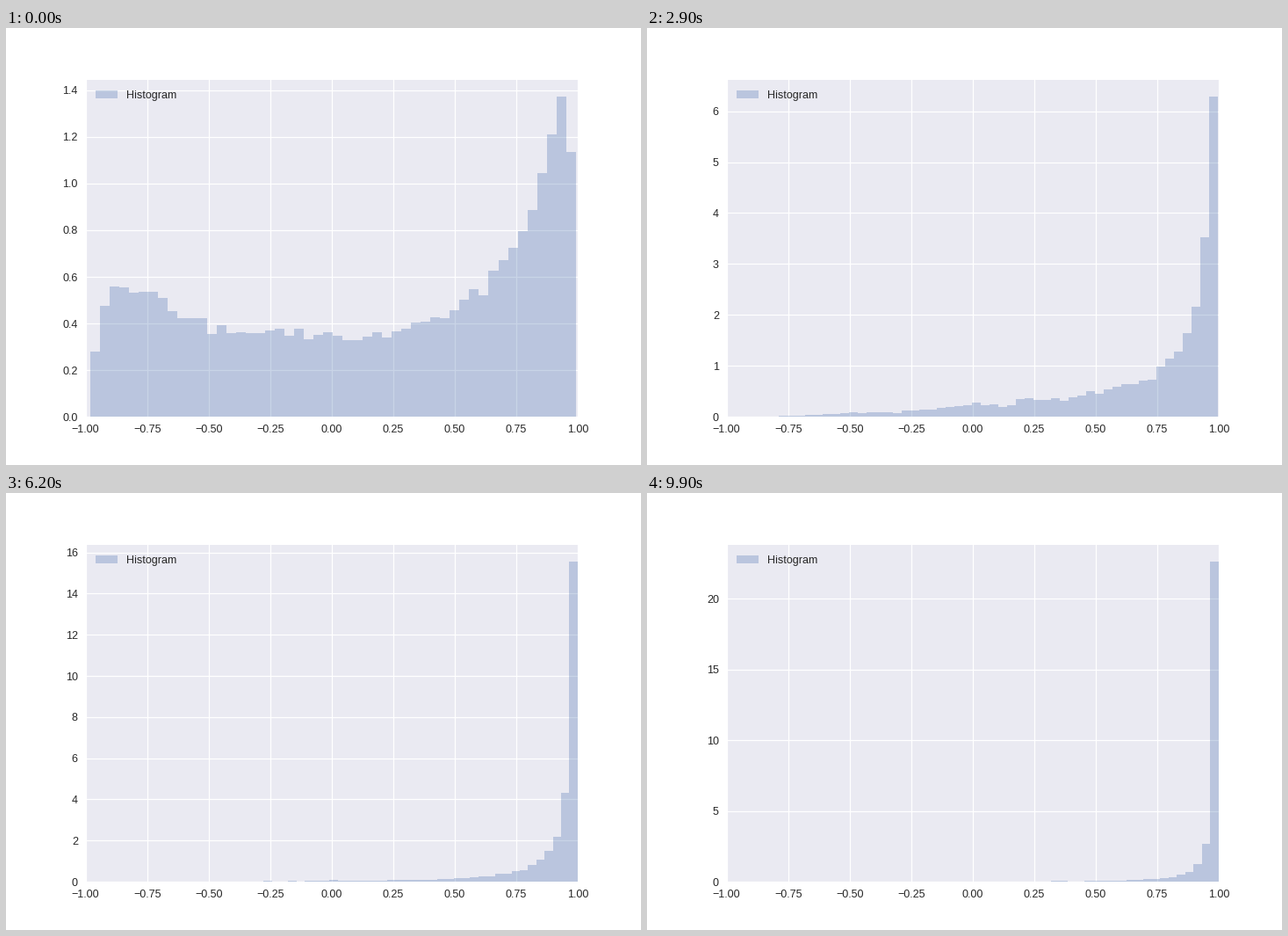
A matplotlib script that plays this animation: 723x497 px, repeating every 10000 ms.

```python
import numpy as np
import matplotlib.pyplot as plt
from matplotlib.animation import FuncAnimation

W, H, DPI = 723, 497, 64
FRAMES, INTERVAL = 100, 100
BINS, SAMPLES = 50, 10000
PX = 72 / DPI  # points per pixel

plt.rcParams.update({
    "font.family": "Liberation Sans",
    "font.size": 12.5 * PX,
    "text.color": "0.15",
    "xtick.color": "0.15",
    "ytick.color": "0.15",
    "axes.facecolor": "#EAEAF2",
    "axes.axisbelow": True,
    "grid.color": "white",
    "grid.linewidth": 1.25 * PX,
})

# x = tanh(z), where z has density ~ exp(-|(z - centre) / scale| ** power)
# and is cut off at centre +- reach.
STEPS = [0, 16, 29, 51, 62, 79, 99]
CENTRE = [.26, .75, 1.25, 1.82, 2.09, 2.48, 2.81]
SCALE = [1.62, 1.68, 1.45, 1.27, 1.34, 1.46, 1.49]
POWER = [3.2, 4.5, 3.2, 2, 2, 2, 2]
REACH = [2.6, 2.5, 2.32, 2.79, 2.92, 3.22, 3.68]


def histogram(i):
    """Bin edges and densities at step i."""
    t = i
    if i < STEPS[1]:  # slow start
        t = STEPS[1] * (i / STEPS[1]) ** 1.7
    centre, scale, power, reach = (
        np.interp(t, STEPS, key) for key in (CENTRE, SCALE, POWER, REACH))

    z = np.linspace(-reach, reach, 2001)
    cdf = np.cumsum(np.exp(-np.abs(z / scale) ** power))
    cdf = (cdf - cdf[0]) / (cdf[-1] - cdf[0])

    lo, hi = np.tanh([centre - reach, centre + reach])
    edges = np.linspace(lo, hi, BINS + 1)
    width = edges[1] - edges[0]
    dens = np.diff(np.interp(np.arctanh(edges) - centre, z, cdf)) / width

    # Sampling noise, fading out towards the tallest bar
    noise = np.random.default_rng(i).normal(size=BINS)
    noise *= np.sqrt(dens / (SAMPLES * width)) * (1 - dens / dens.max())
    return edges, np.maximum(dens + noise, 0)


fig = plt.figure(figsize=(W / DPI, H / DPI), dpi=DPI, facecolor="white")
ax = fig.add_axes([.1253, .1105, .775, .77])
for spine in ax.spines.values():
    spine.set_visible(False)
ax.grid(True)
ax.tick_params(length=0, pad=8.75 * PX)

edges, dens = histogram(0)
bars = ax.bar(edges[:-1], dens, np.diff(edges), align="edge",
              color="#4C72B0", alpha=.3, linewidth=0, label="Histogram")
ax.set_xlim(-1, 1)
ax.legend(loc="upper left", frameon=False)


def update(i):
    edges, dens = histogram(i)
    for bar, x, w, h in zip(bars, edges, np.diff(edges), dens):
        bar.set_bounds(x, 0, w, h)
    ax.set_ylim(0, dens.max() * 1.05)
    return bars.patches


anim = FuncAnimation(fig, update, frames=FRAMES, interval=INTERVAL,
                     repeat=True, repeat_delay=0)
plt.show()
```
